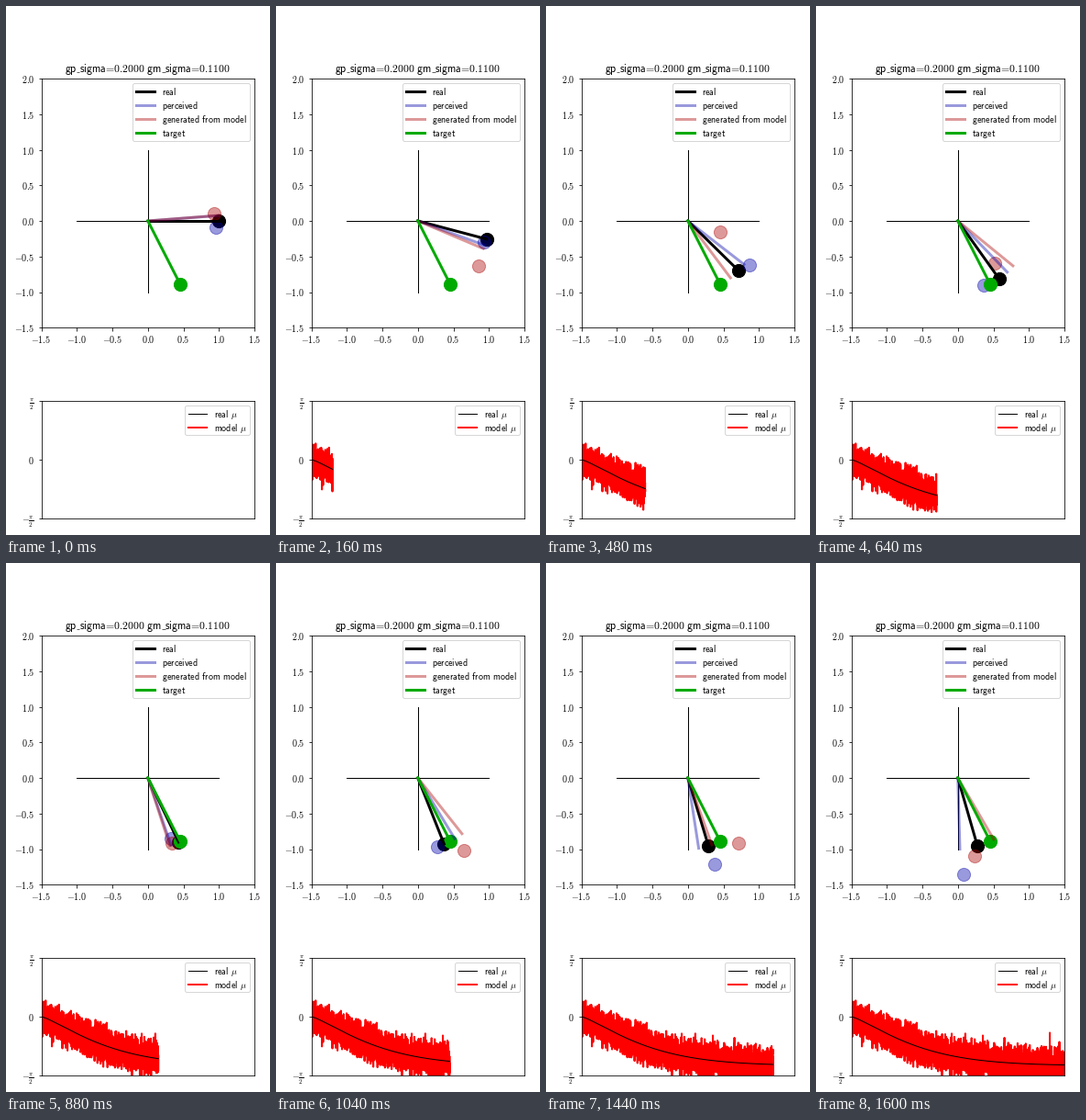
A matplotlib script for the animation above (1680 ms loop, 288 px wide and 576 px high).

```python
import numpy as np
import matplotlib.pyplot as plt
from matplotlib.animation import FuncAnimation
from matplotlib.patches import FancyBboxPatch

W, H = 288, 576
FRAMES, INTERVAL = 21, 80
STEPS = 5000
TARGET = -1.098
BLUE, RED, GREEN = "#0000aa", "#aa0000", "#00aa00"
FADE = 0.4

plt.rcParams["mathtext.fontset"] = "cm"
rng = np.random.default_rng(7)

# The arm eases down towards its final angle; the model guesses around it.
steps = np.linspace(0, 1, STEPS + 1)
real_mu = -1.31 * (1 - np.exp(-(steps / 0.327) ** 1.28))
model_mu = real_mu + rng.normal(0, 0.21, STEPS + 1)


def tip(angle):
    return np.array([np.cos(angle), np.sin(angle)])


def noisy_spot(angle, sigma):
    return np.clip(tip(angle) + rng.normal(0, sigma, 2), (-.37, -1.4), 1.27)


def random_pose(angle):
    seen = angle + rng.normal(0, .12)
    guess = angle + rng.normal(0, .18)
    return seen, noisy_spot(angle, .18), guess, noisy_spot(guess, .28)


def step_at(k):
    return k * STEPS // (FRAMES - 1)


poses = [random_pose(real_mu[step_at(k)]) for k in range(FRAMES)]


def sans(text):
    """Sans-serif maths text with word spaces and a tight equals sign."""
    text = text.replace("=", r"\hspace{-0.2}=\hspace{-0.2}")
    text = text.replace("_", r"\hspace{0.41}").replace(" ", r"\hspace{0.38}")
    return rf"$\mathsf{{{text}}}$"


def add_axes(left, top, right, bottom, **kw):
    box = [left / W, 1 - bottom / H, (right - left) / W, (bottom - top) / H]
    return fig.add_axes(box, **kw)


fig = plt.figure(figsize=(W / 72, H / 72), dpi=72, facecolor="white")

# Arm view
arm = add_axes(38.5, 79, 271, 350.25, xlim=(-1.5, 1.5), ylim=(-1.5, 2))
xt, yt = np.arange(-1.5, 1.6, .5), np.arange(-1.5, 2.1, .5)
arm.set_xticks(xt, [f"${v:.1f}$" for v in xt])
arm.set_yticks(yt, [f"${v:.1f}$" for v in yt])
arm.tick_params(axis="y", pad=4)
arm.plot([-1, 1], [0, 0], color="black", lw=1)
arm.plot([0, 0], [-1, 1], color="black", lw=1)


def make_arm(color, alpha=1):
    line, = arm.plot([], [], color=color, lw=3, alpha=alpha)
    dot = arm.scatter([0], [0], s=200, color=color, lw=1, alpha=alpha)
    return line, dot


real = make_arm("black")
perceived = make_arm(BLUE, FADE)
generated = make_arm(RED, FADE)
target = make_arm(GREEN)

# History view
hist = add_axes(38.5, 430, 271, 558, xlim=(0, 1), ylim=(-np.pi / 2, np.pi / 2))
hist.set_xticks([])
hist.set_yticks([-np.pi / 2, 0, np.pi / 2],
                [r"$-\frac{\pi}{2}$", "$0$", r"$\frac{\pi}{2}$"])
hist.tick_params(axis="y", pad=4)
model_line, = hist.plot([], [], color="red", lw=2)
real_line, = hist.plot([], [], color="black", lw=1)

# Title and legends, placed in pixels
page = add_axes(0, 0, W, H, xlim=(0, W), ylim=(H, 0), zorder=5)
page.axis("off")
page.text(154.75, 72, sans("gp_sigma=0.2000 gm_sigma=0.1100"),
          size=11.75, ha="center", va="baseline")
for x in (76.7, 170):
    page.plot([x, x + 3.5], [72, 72], color="black", lw=.6,
              solid_capstyle="butt")


def legend(left, top, right, bottom, rows):
    page.add_patch(FancyBboxPatch(
        (left, top), right - left, bottom - top, fc="white", ec="0.8", lw=1,
        alpha=.8, boxstyle="round,pad=0,rounding_size=2"))
    for i, (label, color, lw, alpha) in enumerate(rows):
        y = top + 8.5 + 15 * i
        page.plot([left + 3.5, left + 23.5], [y, y], color=color, lw=lw,
                  alpha=alpha)
        page.text(left + 31.5, y + 4, label, size=10, va="baseline")


legend(138.5, 84.5, 266.5, 147.5, [
    (sans("real"), "black", 3, 1),
    (sans("perceived"), BLUE, 3, FADE),
    (sans("generated from model"), RED, 3, FADE),
    (sans("target"), GREEN, 3, 1)])
legend(195.5, 435.5, 266.5, 467.5, [
    (sans("real ") + r"$\mu$", "black", 1, 1),
    (sans("model ") + r"$\mu$", "red", 2, 1)])


def place(part, angle, spot=None):
    line, dot = part
    end = tip(angle)
    line.set_data([0, end[0]], [0, end[1]])
    dot.set_offsets([end if spot is None else spot])


def draw(k):
    n = step_at(k)
    seen, seen_spot, guess, guess_spot = poses[k]
    place(real, real_mu[n])
    place(perceived, seen, seen_spot)
    place(generated, guess, guess_spot)
    place(target, TARGET)
    model_line.set_data(steps[:n], model_mu[:n])
    real_line.set_data(steps[:n], real_mu[:n])
    return []


anim = FuncAnimation(fig, draw, frames=FRAMES, interval=INTERVAL,
                     init_func=lambda: draw(0), repeat=True)
plt.show()
```
